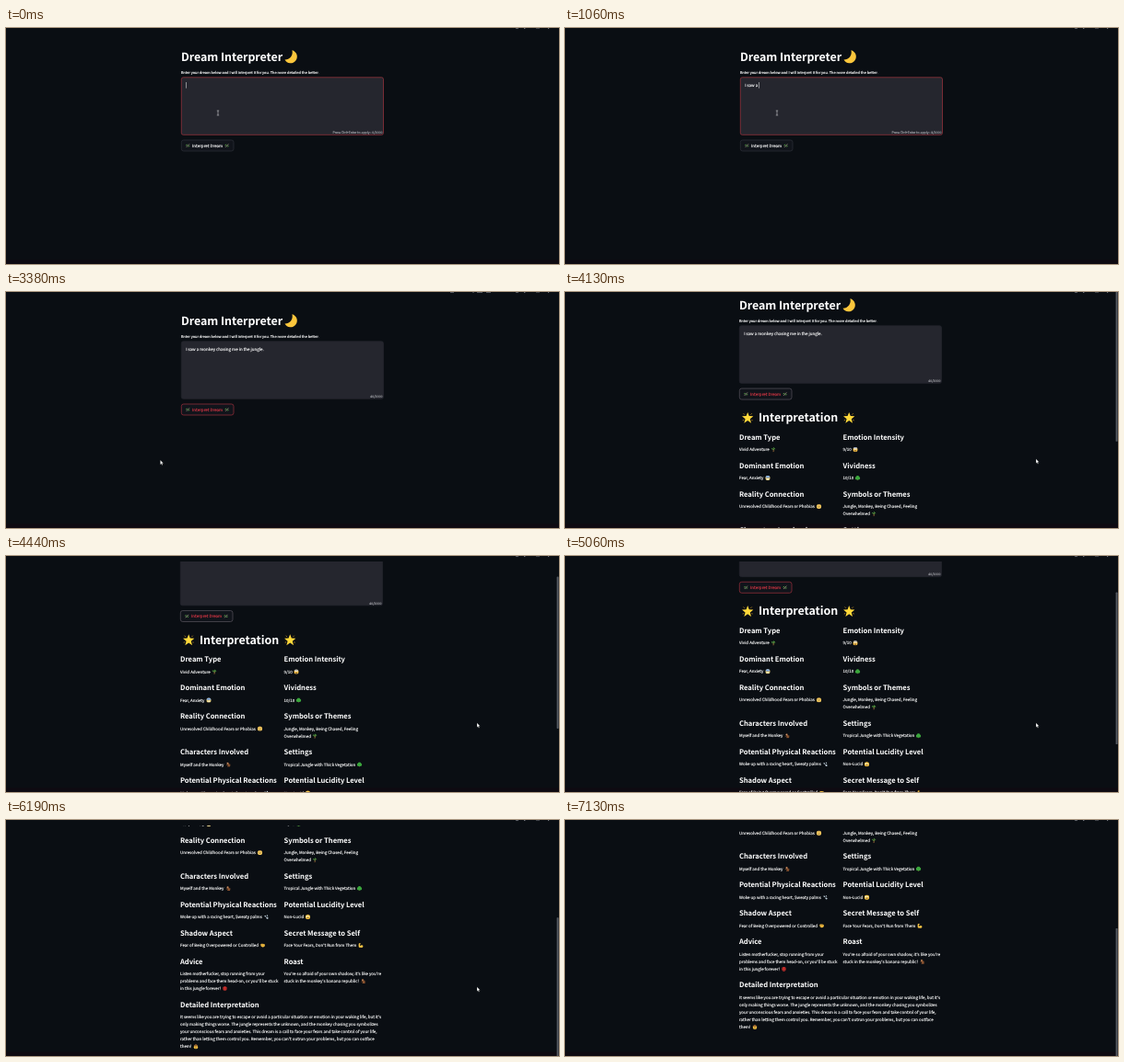
Write an HTML page that moves like this. It is 600 px wide and 257 px high and loops after 7190 ms.

```html
<!DOCTYPE html>
<html lang="en">
<head>
<meta charset="utf-8">
<title>Dream Interpreter</title>
<style>
  html, body { margin: 0; width: 100%; height: 100%; overflow: hidden; background: #0a0e13; }
  svg { display: block; }
  text {
    font: 4.475px "Noto Sans CJK JP", "Noto Sans CJK SC", "Noto Sans CJK KR", "Noto Sans CJK TC", "Noto Sans CJK", "Open Sans", sans-serif;
    color: #fafafa;
    fill: currentColor;
    stroke: currentColor;
    stroke-width: .14;
    text-rendering: geometricPrecision;
    white-space: pre;
  }
  .h1, .h3 { font-weight: 700; letter-spacing: -.005em; color: #fff; stroke: none; }
  .h1 { font-size: 12.45px; }
  .h3 { font-size: 7.63px; }
  .label { font-size: 3.915px; }
  .hint { font-size: 3.5px; color: #a3a4aa; text-anchor: end; }
  #area { fill: #25262e; stroke: #25262e; stroke-width: .7; }
  #area.focus { stroke: #a3363f; }
  #button rect { fill: #11141b; stroke: #343840; stroke-width: .6; }
  #button.hot text { color: #d23644; }
  #button.hot rect { stroke: #b83643; }
  #button.idle rect { stroke: #66616a; }
</style>
</head>
<body>
<svg width="600" height="257" viewBox="0 0 600 257">
  <defs>
    <symbol id="star" viewBox="0 0 10 10">
      <path fill="#ffd83a" d="M5 .2 6.3 3.6 10 3.8 7.1 6.1 8.1 9.7 5 7.6 1.9 9.7 2.9 6.1 0 3.8 3.7 3.6Z"/>
      <path stroke="#f7b52c" stroke-width=".5" d="M1.3 1.3 2.4 2.4M8.7 1.3 7.6 2.4M.6 7.4 1.7 7M9.4 7.4 8.3 7"/>
    </symbol>
    <symbol id="palm" viewBox="0 0 10 10">
      <path fill="none" stroke="#a9713f" stroke-width="1.5" d="M5.2 3.5Q5.8 7 5 10"/>
      <path fill="#5aba49" d="M5 3.6Q2 1 .8 4.8 3 3.2 5 3.6Q8 1 9.3 4.8 7 3.2 5 3.6Q3 5 3 6.8 5 5.5 5 3.6Q7.4 4.6 7.3 6.6 5.4 5.6 5 3.6Q4 1 6 .4 7 2 5 3.6"/>
    </symbol>
    <symbol id="tree" viewBox="0 0 10 10">
      <path fill="#7d5130" d="M4.3 6h1.4v4H4.3z"/>
      <path fill="#3aa53c" d="M5 .4A3 3 0 0 1 8 2.6 2.8 2.8 0 0 1 8 8Q5 9 2 8A2.8 2.8 0 0 1 2 2.6 3 3 0 0 1 5 .4"/>
    </symbol>
    <symbol id="scream" viewBox="0 0 10 10">
      <circle cx="5" cy="5" r="4.6" fill="#f2bd45"/>
      <path fill="#8da6d8" d="M.9 3A4.6 4.6 0 0 1 9.1 3Q5 2 .9 3"/>
      <g fill="#fff"><circle cx="3.4" cy="4" r="1.2"/><circle cx="6.6" cy="4" r="1.2"/></g>
      <ellipse cx="5" cy="7.3" rx="1" ry="1.5" fill="#4d3020"/>
    </symbol>
    <symbol id="anxious" viewBox="0 0 10 10">
      <circle cx="5" cy="5" r="4.6" fill="#e9cf7a"/>
      <path fill="#84aee6" d="M.9 3A4.6 4.6 0 0 1 9.1 3L8.7 4.4 1.3 4.4Z"/>
      <path fill="#fff" d="M3 6.2h4v1.7H3z"/>
      <g fill="#3d3023"><circle cx="3.4" cy="4.6" r=".7"/><circle cx="6.6" cy="4.6" r=".7"/></g>
    </symbol>
    <symbol id="child" viewBox="0 0 10 10">
      <circle cx="5" cy="5" r="4.6" fill="#f4c95e"/>
      <path fill="#80552d" d="M3.5 1.1Q5-.3 6.5 1.1 6 2.2 5 1.8"/>
      <g fill="#493221"><circle cx="3.4" cy="4.8" r=".7"/><circle cx="6.6" cy="4.8" r=".7"/><path d="M3.4 6.8h3.2Q5 8.4 3.4 6.8"/></g>
    </symbol>
    <symbol id="zany" viewBox="0 0 10 10">
      <circle cx="5" cy="5" r="4.6" fill="#f5c343"/>
      <g fill="#fff"><circle cx="3.2" cy="4" r="1.4"/><circle cx="6.8" cy="4" r="1"/></g>
      <path fill="#5a371f" d="M2.8 6.2h4.6Q5.3 9 2.8 6.2"/>
    </symbol>
    <symbol id="cowboy" viewBox="0 0 10 10">
      <circle cx="5" cy="5.8" r="4" fill="#f5c343"/>
      <path fill="#95602f" d="M0 3Q2 3.2 2.6 2.8 3-.2 5 .7 7-.2 7.4 2.8 8 3.2 10 3 8 5 5 4.7 2 5 0 3"/>
      <path fill="#5a371f" d="M3 6.8h4Q5 9.2 3 6.8"/>
    </symbol>
    <symbol id="monkey" viewBox="0 0 10 10">
      <path fill="#8b5430" d="M3 1.2A2.2 2.2 0 0 1 6.4 3.2Q9 4 8.6 9.4H3.2Q2.4 8.6 4.4 8L4 5.4 2 7 1.2 6.2 3.2 4.2Q2 2.6 3 1.2"/>
      <path fill="none" stroke="#8b5430" stroke-width=".8" d="M8.2 8.8Q10.4 7 8.8 4"/>
      <circle cx="3.7" cy="2.7" r="1.1" fill="#dfad83"/>
    </symbol>
    <symbol id="drops" viewBox="0 0 10 10">
      <path fill="#c3d3df" d="M1 2.6Q4 1 5 4.6 2 5.6 1 2.6M5.6 1Q8.6 1.2 8 4.4 5.4 4 5.6 1M4.4 6Q7.4 4.6 9 7.6 7.6 9.8 5.6 8.4Z"/>
    </symbol>
    <symbol id="fist" viewBox="0 0 10 10">
      <path fill="#f6c344" d="M1 4Q1 1.6 3.6 1.8L8 2.2Q9.6 3 9.2 6 8.4 8.8 5 8.6 1.2 8.2 1 4"/>
      <path fill="none" stroke="#b27b26" stroke-width=".6" d="M3.4 2v3M5.2 2.2v3M7 2.4v3M2 5.8h5"/>
    </symbol>
    <symbol id="arm" viewBox="0 0 10 10">
      <path fill="#f6c344" d="M1 1.4Q3.8-.2 4.6 1.8L3.8 3.4 2.8 3.2 3.6 6Q6 3.4 8.8 5.2 10.6 9 7 9.4L1.4 9Q-.2 6 1 1.4"/>
    </symbol>
    <symbol id="mask" viewBox="0 0 10 10">
      <path fill="#d92f2b" d="M1.4 2.2Q5-.4 8.6 2.2 9.6 9 5 9.7 .4 9 1.4 2.2"/>
      <path fill="#292020" d="M2.2 3.4 4.2 4.6 2.6 5ZM7.8 3.4 5.8 4.6 7.4 5ZM3 7.4h4v1H3z"/>
      <path fill="#d92f2b" d="M4.4 4h1.2v3H4.4z"/>
    </symbol>
    <symbol id="sprig" viewBox="0 0 10 10">
      <path fill="#57a747" d="M.8 5.6Q1 2.6 4.4 2.6 4 5.4 .8 5.6M5 8Q5.6 5 9 5 8.4 8 5 8"/>
      <path stroke="#d9d9b0" stroke-width="1.1" d="M2.2 8.4 8 2.2"/>
    </symbol>
  </defs>

  <rect width="600" height="257" fill="#0a0e13"/>
  <rect y="252.5" width="600" height="4.5" fill="#0e0a11"/>

  <g id="page">
    <text class="h1" x="190" y="36">Dream Interpreter</text>
    <path fill="#fcc63c" d="M310.4 24.3A7.1 7.1 0 1 1 302.5 34.6A8 8 0 0 0 310.4 24.3"/>
    <text class="label" x="190" y="50">Enter your dream below and I will interpret it for you. The more detailed the better.</text>
    <rect id="area" x="190.3" y="53.8" width="219.2" height="62.5" rx="2"/>
    <text id="typed" x="195.2" y="64"></text>
    <rect id="caret" y="59" width=".6" height="6.6" fill="#d5d5d8"/>
    <text id="hint" class="hint" x="408.4" y="115"></text>
    <g id="button">
      <rect x="190.3" y="122" width="56.7" height="12" rx="2.4"/>
      <text x="202" y="129.6">Interpret Dream</text>
      <use href="#sprig" x="194.6" y="125.2" width="5.4" height="5.4"/>
      <use href="#sprig" x="237" y="125.2" width="5.4" height="5.4"/>
    </g>
    <g id="results">
      <use href="#star" x="193" y="147.6" width="12.4" height="12.4"/>
      <text class="h1" x="211" y="158.2">Interpretation</text>
      <use href="#star" x="303" y="147.6" width="12.4" height="12.4"/>
    </g>
  </g>

  <rect id="header" width="600" height="6" fill="#0a0e13"/>
  <path fill="#70737a" d="M553 0h3v.7h-3zM562 0h1.4v.9H562zM575 0h4v.6h-4zM588 0h1.2v1H588z"/>
  <path id="running" fill="#70737a" d="M482 0h4v.8h-4zM506 0h2v.6h-2zM511 0h6v.7h-6zM521 0h5v.8h-5z"/>
  <rect id="thumb" x="597.6" width="2" height="165.5" rx=".6" fill="#565a62"/>
  <path id="beam" fill="none" stroke="#c9cacf" stroke-width=".6" d="M-1.2-2.5H1.2M0-2.5V2.5M-1.2 2.5H1.2"/>
  <path id="arrow" fill="#fff" stroke="#222" stroke-width=".25" d="M0 0V4.9L1.1 3.9 1.9 5.6 2.7 5.2 1.9 3.6H3.4Z"/>
</svg>

<script>
const LOOP = 7190, FRAME = 62.5;
const DREAM = "I saw a monkey chasing me in the jungle.";
const el = id => document.getElementById(id);
const [page, area, typed, caret, hint, button, results, header, running, thumb, beam, arrow] =
  ["page", "area", "typed", "caret", "hint", "button", "results", "header", "running", "thumb", "beam", "arrow"].map(el);

function add(tag, attrs, content = "") {
  const node = document.createElementNS("http://www.w3.org/2000/svg", tag);
  for (const key in attrs) node.setAttribute(key, attrs[key]);
  node.textContent = content;
  results.append(node);
}

// Heading, lines of text, and an emoji centred at iconX on the last line
function section(x, y, title, lines, icon, iconX) {
  add("text", { class: "h3", x, y }, title);
  lines.forEach((line, i) => add("text", { x, y: y + 12.7 + i * 8 }, line));
  const last = y + 12.7 + (lines.length - 1) * 8;
  add("use", { href: "#" + icon, x: iconX + 1 - 2.8, y: last - 4.5, width: 5.6, height: 5.6 });
}

const LEFT = 190, RIGHT = 302.6;
const rows = [
  [177.5, ["Dream Type", ["Vivid Adventure"], "palm", 226],
          ["Emotion Intensity", ["9/10"], "scream", 315]],
  [208.5, ["Dominant Emotion", ["Fear, Anxiety"], "anxious", 220],
          ["Vividness", ["10/10"], "tree", 317.5]],
  [239.5, ["Reality Connection", ["Unresolved Childhood Fears or Phobias"], "child", 275.5],
          ["Symbols or Themes", ["Jungle, Monkey, Being Chased, Feeling", "Overwhelmed"], "palm", 335]],
  [278.5, ["Characters Involved", ["Myself and the Monkey"], "monkey", 241],
          ["Settings", ["Tropical Jungle with Thick Vegetation"], "tree", 383.5]],
  [309.5, ["Potential Physical Reactions", ["Woke up with a racing heart, Sweaty palms"], "drops", 282.5],
          ["Potential Lucidity Level", ["Non-Lucid"], "zany", 327.5]],
  [340.5, ["Shadow Aspect", ["Fear of Being Overpowered or Controlled"], "fist", 278.5],
          ["Secret Message to Self", ["Face Your Fears, Don't Run from Them"], "arm", 385]],
  [371.5, ["Advice", ["Listen motherfucker, stop running from your",
                      "problems and face them head-on, or you'll be stuck",
                      "in this jungle forever!"], "mask", 237.5],
          ["Roast", ["You're so afraid of your own shadow, it's like you're",
                     "stuck in the monkey's banana republic!"], "monkey", 387.5]],
  [418.7, ["Detailed Interpretation", [
    "It seems like you are trying to escape or avoid a particular situation or emotion in your waking life, but it's",
    "only making things worse. The jungle represents the unknown, and the monkey chasing you symbolizes",
    "your unconscious fears and anxieties. This dream is a call to face your fears and take control of your life,",
    "rather than letting them control you. Remember, you can't outrun your problems, but you can outface",
    "them!"], "cowboy", 206]],
];
for (const [y, left, right] of rows) {
  section(LEFT, y, ...left);
  if (right) section(RIGHT, y, ...right);
}

// Eased value between [time, value] stops
function track(stops, t) {
  let [t0, v0] = stops[0];
  for (const [t1, v1] of stops) {
    if (t < t1) {
      const k = Math.max(0, (t - t0) / (t1 - t0));
      return v0 + (v1 - v0) * k * k * (3 - 2 * k);
    }
    [t0, v0] = [t1, v1];
  }
  return v0;
}

const SCROLL = [[4060, 0], [4250, 62.5], [4620, 62.5], [4780, 93.75], [5100, 93.75],
                [5430, 156.25], [5870, 156.25], [6350, 236.3]];
const MOUSE_X = [[2750, 230], [2940, 222], [3100, 222], [3375, 167.4], [3500, 138], [3560, 138],
                 [4000, 511], [6540, 511], [6800, 532]];
const MOUSE_Y = [[2750, 92.5], [2940, 127], [3100, 127], [3375, 183], [3500, 178], [3560, 178],
                 [4000, 181.7], [6540, 181.7], [6800, 258]];

const show = (node, on) => node.setAttribute("visibility", on ? "visible" : "hidden");
const move = (node, x, y) => node.setAttribute("transform", `translate(${x} ${y})`);

function draw(time) {
  const frame = Math.floor(time / FRAME), t = frame * FRAME;
  const focused = t < 3060, done = t >= 3870;

  const count = frame < 9 ? 0 : Math.min(DREAM.length, Math.floor(1 + (frame - 9) * 1.1145));
  typed.textContent = DREAM.slice(0, count);
  caret.setAttribute("x", 195.2 + (count ? typed.getComputedTextLength() : 0));
  show(caret, focused && !(frame >= 3 && frame < 5));
  hint.textContent = (focused ? "Press Ctrl+Enter to apply • " : "") + count + "/2000";
  area.setAttribute("class", focused ? "focus" : "");
  button.setAttribute("class", t < 2930 ? "" : t >= 4000 && t < 4650 ? "hot idle" : "hot");

  const scroll = track(SCROLL, t);
  move(page, done ? -1 : 0, -scroll);
  show(results, done);
  show(header, scroll > 0);
  show(thumb, done);
  thumb.setAttribute("y", .55 * scroll - 12);
  show(running, t >= 3100 && !done);

  const x = track(MOUSE_X, t), y = track(MOUSE_Y, t);
  const inArea = t < 3000 && y < 116;
  show(beam, inArea);
  show(arrow, !inArea);
  move(beam, x, y);
  move(arrow, x, y);
}

const start = performance.now();
function tick() {
  draw((performance.now() - start) % LOOP);
  requestAnimationFrame(tick);
}
tick();
</script>
</body>
</html>
```
